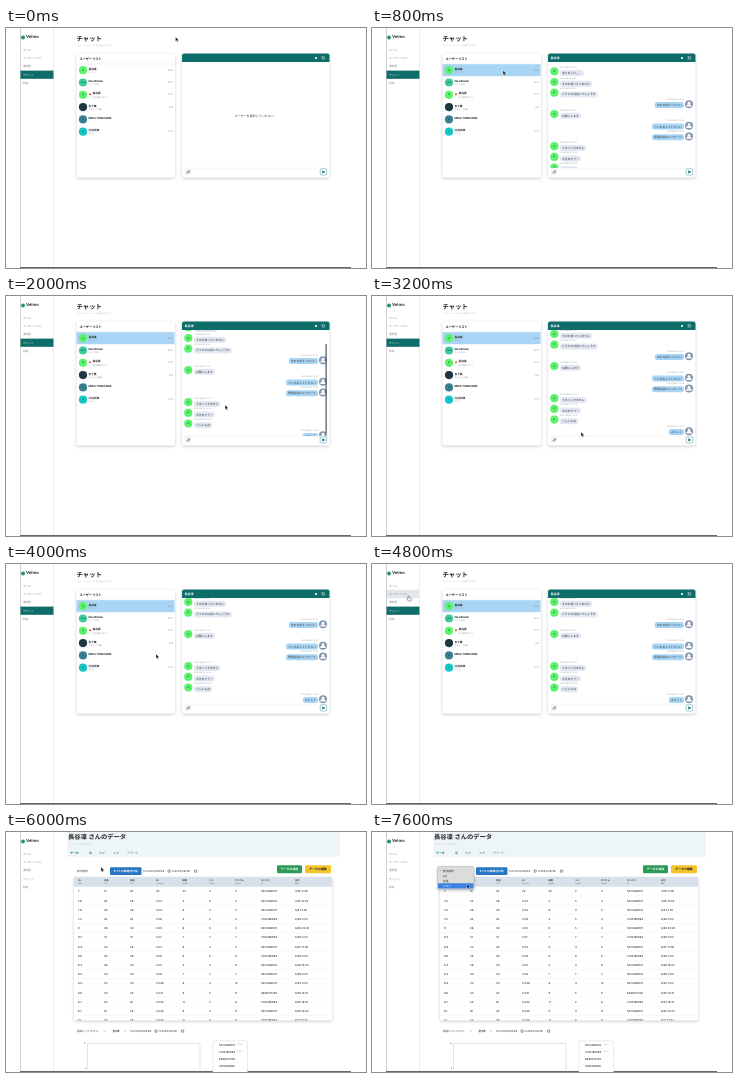
Animation of 360 by 240 pixels, one loop 8000 ms. Source, as an HTML page:

```html
<!DOCTYPE html>
<html>
<head>
<meta charset="utf-8">
<style>
html, body { margin: 0; width: 100%; height: 100%; overflow: hidden; background: #fff; }
svg { display: block; width: 100vw; height: 100vh; }
text { font-family: Inter, "Noto Sans CJK JP", "Noto Sans CJK", sans-serif; dominant-baseline: central; white-space: pre; text-rendering: geometricPrecision; }
.card { filter: drop-shadow(0 1.5px 1.5px #0003); }
</style>
</head>
<body>
<svg id="stage" viewBox="0 0 360 240"></svg>
<script>
const STEP = 400, LOOP = 8000;
const TEAL = '#0f6d69', INK = '#222', GREY = '#8b9096', GREEN = '#5cf36c', SKY = '#a8d5f6';
const stage = document.getElementById('stage');

const rect = (x, y, w, h, fill, r = 0, extra = '') =>
  `<rect x="${x}" y="${y}" width="${w}" height="${h}" rx="${r}" fill="${fill}" ${extra}/>`;
const circle = (x, y, r, fill) => `<circle cx="${x}" cy="${y}" r="${r}" fill="${fill}"/>`;
const path = (d, stroke, width = .5, fill = 'none') =>
  `<path d="${d}" stroke="${stroke}" stroke-width="${width}" fill="${fill}"/>`;
const text = (x, y, s, size, fill = INK, weight = 400, anchor = 'start') =>
  `<text x="${x}" y="${y}" font-size="${size}" fill="${fill}" font-weight="${weight}" text-anchor="${anchor}">${s}</text>`;
const card = (x, y, w, h) => rect(x, y, w, h, '#fff', 1.5, 'class="card"');
const caret = (x, y) => path(`M${x} ${y}l1 1 1-1`, '#555', .4);

const users = [
  ['長谷凜', 'スタッフ', '4/29', GREEN, '長'],
  ['Neal Brook', 'こんにちは', '5/27', '#3ec9a0', 'Neal'],
  ['長谷凜', '水の様子はどう', '7/27', GREEN, '長'],
  ['五十嵐', 'よろしくお願い', '5/4', '#1e3642', '五'],
  ['MIKA TOMIZAWA', '', '', '#3c7f93', 'M'],
  ['川辺次郎', 'テスト', '1/27', '#16c6c4', '川'],
];
// A leading ">" marks a message sent from this side.
const messages = ['送りました。。', 'その水使っていません', 'どうすれば良いでしょうか', '>水をお控えください',
  'お願いします', '>つくを出してください', '>管理会話のメッセージ', 'うまくいきません', '大丈夫そう！',
  'くんともお', '>よろしく'];

function sidebar(active, hover) {
  let s = path('M14.5 0V240', '#a4a4a4') + path('M47.5 0V240', '#d9d9d9') + path('M14 239.5H345', '#666', 1) +
    circle(17, 9.5, 2, '#1d9a62') + text(20, 9.8, 'Velmo', 4.2, '#333', 700);
  ['ホーム', 'ユーザーリスト', '通知歴', 'チャット', '設定'].forEach((name, i) => {
    const y = 21.6 + i * 8.4;
    if (i === hover) s += rect(15, y - 4.2, 32, 8.4, '#e2e7ea');
    if (i === active) s += rect(14.5, y - 4.2, 33, 8.2, TEAL);
    s += text(17, y, name, 2.7, i === active ? '#fff' : '#7d8388');
  });
  return s;
}

const heading = (title, sub) => text(70.5, 11.3, title, 6.4, INK, 700) + text(71, 17.7, sub, 1.9, '#b0b4b8');

function userRow([name, note, date, color, mark], i, selected) {
  const y = 42.2 + i * 12.3, x = i === 2 ? 86.5 : 82.5;
  return (selected ? rect(70.5, y - 6, 98, 12, SKY) : '') +
    circle(77, y, 4.1, color) + text(77, y, mark, 2.2, '#17463f', 400, 'middle') +
    (i === 2 ? circle(84, y - .5, 1, '#e8483f') : '') +
    text(x, y - 1.6, name, 2.7, INK, 700) + text(x, y + 2.2, note, 2.1, GREY) +
    text(167, y, date, 2.4, GREY, 400, 'end');
}

function message(raw, i, scroll) {
  const mine = raw[0] === '>', body = mine ? raw.slice(1) : raw;
  const y = 45 + i * 10.7 - scroll, w = body.length * 2.8 + 4, x = mine ? 312 - w : 188;
  return text(mine ? 312 : 188, y - 5.2, '2022/06/' + (17 + i) + ' 12:3' + i % 10, 2, GREY, 400, mine ? 'end' : 'start') +
    rect(x, y - 3, w, 6, mine ? SKY : '#e2e8f2', 2.5) + text(x + 2, y, body, 2.8, '#333') +
    (mine
      ? circle(317, y - .8, 4, '#8595aa') + circle(317, y - 1.9, 1.4, '#fff') +
        path(`M314.3 ${y + 1.5}a2.7 2.4 0 0 1 5.4 0z`, 'none', 0, '#fff')
      : circle(182.3, y - 1.7, 4.1, GREEN) + text(182.3, y - 1.7, '長', 2.2, '#17463f', 400, 'middle'));
}

function chatPage(step) {
  const open = step >= 2, scroll = step < 4 ? 0 : step === 4 ? 5 : step === 5 ? 12 : 16;
  let s = sidebar(3, step >= 11 ? 1 : -1) + heading('チャット', 'ユーザーとメッセージを送受信できます') +
    card(70.5, 25.5, 98.5, 124) + text(73.5, 30.8, 'ユーザーリスト', 3.2, INK, 700) +
    path('M70.5 36H169', '#e6e6e6') + users.map((u, i) => userRow(u, i, open && !i)).join('') +
    card(176, 25.5, 147.5, 124) +
    path('M176 34V27.5q0-2 2-2H321.5q2 0 2 2V34z', 'none', 0, TEAL) +
    circle(310, 30, 1.1, '#fff') + path('M316 30a1.4 1.4 0 1 0 .5-1.2M316 28.2v1.2h1.2', '#fff', .5);
  if (open) {
    s += text(178.5, 30.2, '長谷凜', 3, '#fff', 700) +
      `<g clip-path="url(#log)">${messages.map((m, i) => message(m, i, scroll)).join('')}</g>`;
    if (step === 4 || step === 5) s += rect(319.5, step === 4 ? 43 : 48, 1.2, 89, '#4c5358', .6);
  } else s += text(249.5, 87.5, 'ユーザーを選択してください。', 3, '#333', 400, 'middle');
  return s + path('M177 140.2H322.5', '#e9ebed') + rect(179, 141, 6, 5.6, '#eef0f2', 1) +
    path('M180.5 145.2l2.6-2.6 .7.7-2 2', '#444', .6) +
    rect(314.2, 140.8, 6.5, 6.2, '#fff', 1, 'stroke="#4a94a8" stroke-width=".5"') +
    path('M316 142.3l3.6 1.6-3.6 1.6.5-1.6z', 'none', 0, TEAL);
}

function listPage() {
  let s = sidebar(1, -1) + heading('ユーザーリスト', '登録ユーザーの一覧です');
  users.forEach(([name], i) => { s += text(74, 42 + i * 12.3, name, 2.8, INK, 500); });
  return s;
}

const A = '5310462970', B = '2740180963', C = '6639017245', D = '4105239981';
const cols = [72, 98, 124, 150, 176.5, 203, 229, 255, 289];
const rows = [
  `7 10 24 22 20 2 3 ${A} 4/15_11:38`, `7.6 24 28 0.03 4 5 4 ${A} 4/15_13:03`,
  `7.6 26 29 0.03 6 3 5 ${A} 5/8_13:00`, `7.3 24 24 0.06 4 5 4 ${B} 6/26_0:00`,
  `9 26 32 0.05 8 5 3 ${A} 6/28_23:20`, `9.3 31 31 0.07 7 7 7 ${B} 6/29_0:00`,
  `6.9 20 25 0.03 6 4 5 ${A} 6/27_11:08`, `6.6 25 26 0.06 6 6 8 ${B} 6/28_0:00`,
  `6.4 26 30 0.05 4 3 9 ${A} 6/28_15:00`, `6.5 30 30 0.06 7 7 7 ${A} 6/28_0:00`,
  `8.5 20 30 0.046 6 4 12 ${A} 6/22_0:00`, `6.8 30 23 0.041 9 5 9 ${C} 6/25_14:31`,
  `6.7 23 16 0.042 11 2 8 ${B} 6/22_16:31`, `8.1 16 25 0.045 9 3 11 ${A} 6/25_14:20`,
  `7.1 22 28 0.046 11 6 8 ${B} 12/7_12:31`,
];
const heads = ['PH|(PH)', '水温|(°C)', '気温|(°C)', 'EC|(mS/cm)', '硝酸|(mg/L)', 'リン|(mg/L)', 'カリウム|(mg/L)', 'デバイス|ID', '日付|時刻'];

const dates = (x, y) => ['from2022/06/28', 'to2022/06/28'].map((s, i) =>
  text(x + i * 29, y, s, 2.7, '#333') +
  rect(x + 25 + i * 26.5, y - 1.2, 2.2, 2.2, 'none', .3, 'stroke="#333" stroke-width=".5"')).join('');
const button = (x, y, w, h, fill, label, ink, size = 2.7) =>
  rect(x, y, w, h, fill, 1.2) + text(x + w / 2, y + h / 2, label, size, ink, 600, 'middle');

function menu(pick) {
  let s = rect(65.5, 34.5, 36.5, 23, '#dcdcdc', 1.5, 'class="card" stroke="#aaa" stroke-width=".4"');
  ['表示選択', 'pH', '水温', 'メモリ'].forEach((name, i) => {
    const y = 38.5 + i * 5.1;
    if (i === pick) s += rect(66, y - 2.6, 35.5, 5.2, '#3f82e4', .8);
    s += (i ? '' : text(67.5, y, '✓', 2.5, pick ? '#222' : '#fff')) + text(71, y, name, 2.7, i === pick ? '#fff' : '#222');
  });
  return s;
}

function dataPage(step) {
  let s = sidebar(-1, -1) + rect(61.5, 0, 272.5, 24.8, '#eef5f7') +
    text(62, 5.4, '長谷凜 さんのデータ', 6.3, INK, 700) + text(62.5, 12.8, 'ユーザーデータの詳細です', 1.9, '#a9bcc4');
  [[64, 'データ'], [83, '値'], [93, 'タグ'], [107, 'メモ'], [121, 'アラート']].forEach(([x, name], i) => {
    s += text(x, 20.5, name, 2.9, i ? '#555' : TEAL, i ? 500 : 700);
  });
  s += text(71, 39, '表示選択', 2.7, '#333') + caret(94, 38.5) +
    button(104, 35.3, 31.5, 7.6, '#2676c4', 'すべての期間(全4件)', '#fff') + dates(137, 39.2) +
    button(271, 33.2, 25, 8, '#2b9a57', 'データの追加', '#fff', 2.9) + button(299, 33.2, 26, 8, '#f3c42c', 'データの編集', '#222', 2.9) +
    card(68, 45, 258, 143.5) + rect(68, 45, 258, 9.8, '#d8e0ec', 1);
  heads.forEach((h, i) => {
    const [name, unit] = h.split('|');
    s += text(cols[i], 48.3, name, 2.2, '#333', 600) + text(cols[i], 51.6, unit, 1.8, '#555');
  });
  s += '<g clip-path="url(#table)">';
  rows.forEach((row, r) => {
    const y = 59.3 + r * 9.2;
    row.split(' ').forEach((v, i) => { s += text(cols[i], y, v.replace('_', ' '), 2.7, '#333', 500); });
    s += path(`M68 ${y + 4.6}H326`, '#ececec', .4);
  });
  s += '</g>' + text(71, 199, '選択してください', 2.7, '#333') + caret(97.5, 198.5) +
    text(106.5, 199, '全4件', 2.7, '#333', 600) + caret(118, 198.5) + dates(124, 199.2) +
    path('M81.5 240V211.5H194V240', '#b8b8b8', .4) +
    text(80, 211.8, '10', 2.2, '#666', 400, 'end') + text(80, 236, '8', 2.2, '#666', 400, 'end') +
    rect(207, 208.8, 34.5, 40, '#fff', 1, 'stroke="#ccc" stroke-width=".4"');
  [A, B, C, D].forEach((id, i) => {
    const y = 213 + i * 7.1;
    s += text(213, y, id, 2.7, '#333', 500) + (i < 2 ? text(231, y, 'メモリ', 2, GREY) : '');
  });
  return s + (step >= 18 ? menu(step === 18 ? 0 : 3) : '');
}

// Pointer tip for each step.
const tips = [[169.5, 9], [140, 38], [131, 42.5], [131, 42.5], [205, 92], [219, 109], [218, 117], [213, 130], [209, 136],
  [204, 132], [150, 90], [70, 45], [36.5, 32], [37, 32], [98, 43], [95, 35], [93, 40], [90, 39], [89, 39], [95, 52]];

function pointer(step) {
  const [x, y] = tips[step];
  const hand = step >= 11 && step <= 14;
  return hand
    ? path(`M${x - .5} ${y}q.6-.6 1.2 0v1.6l1.8.5q.7.3.4 1.2l-.5 1.7h-2.6l-1.5-2q.3-.8 1.2 0z`, '#222', .4, '#fff')
    : path(`M${x} ${y}v4.4l1-.9.8 1.8.8-.4-.7-1.7h1.4z`, '#fff', .35, '#111');
}

const defs = '<defs><clipPath id="log">' + rect(176, 34, 147.5, 106, '#000') +
  '</clipPath><clipPath id="table">' + rect(68, 54.8, 258, 133.7, '#000') + '</clipPath></defs>';
let shown = -1;

function frame(now) {
  const step = Math.floor(now % LOOP / STEP);
  if (step !== shown) {
    shown = step;
    const page = step < 13 ? chatPage(step) : step < 15 ? listPage() : dataPage(step);
    stage.innerHTML = defs + page + pointer(step);
  }
  requestAnimationFrame(frame);
}
frame(0);
</script>
</body>
</html>
```
